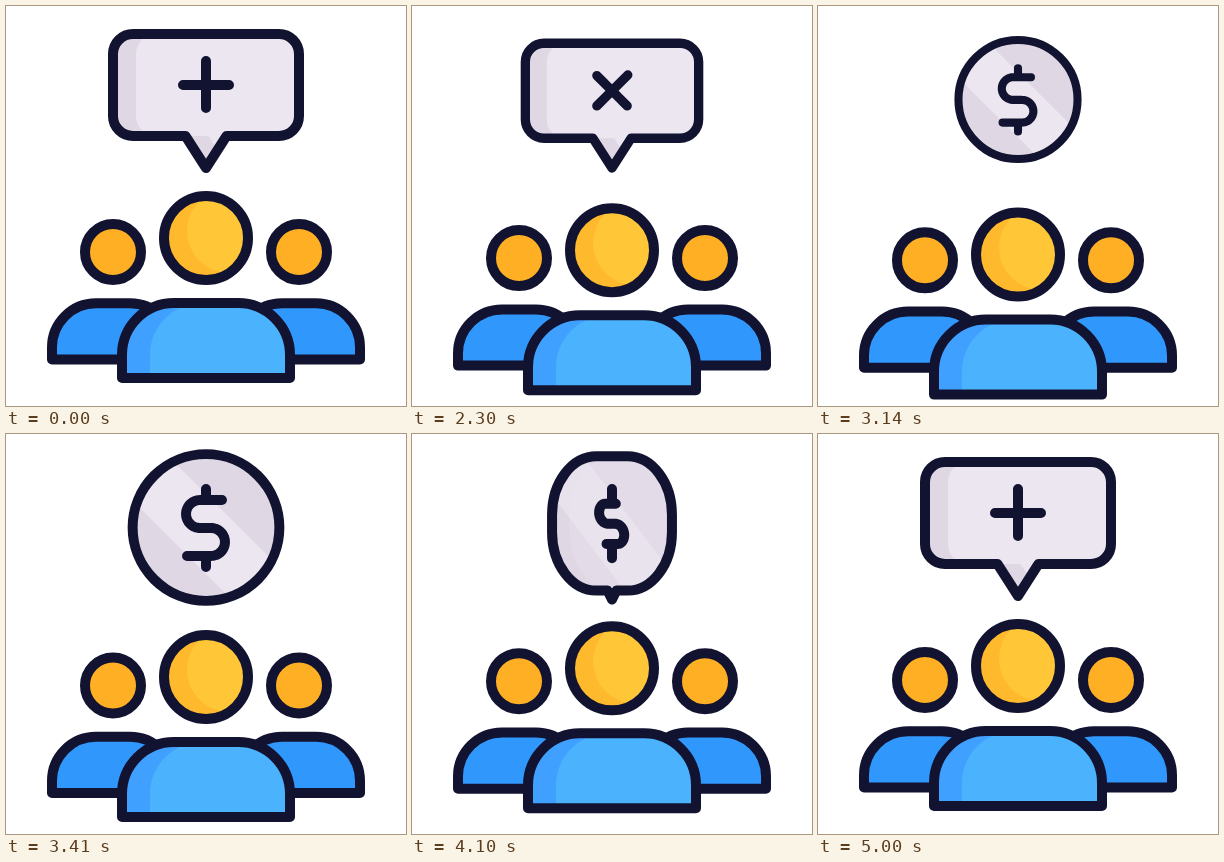
Recreate the animation shown at these times as an HTML page with a canvas. Size 400x400 px, loop 5.03 s.

```html
<!DOCTYPE html>
<html lang="en">
<head>
<meta charset="utf-8">
<title>Group and message</title>
<style>
html, body { margin: 0; width: 100%; height: 100%; overflow: hidden; background: #fff; }
canvas { display: block; width: 400px; height: 400px; }
</style>
</head>
<body>
<canvas id="stage" width="400" height="400"></canvas>
<script>
const ctx = document.getElementById('stage').getContext('2d');
const LOOP = 5030, HOLD = 2030, STEP = 30;
const INK = '#121331', PALE = '#ebe6ef', SHADE = '#dfd8e4';
const YELLOW = '#ffc738', AMBER = '#ffb92c', ORANGE = '#ffaf24';
const SKY = '#4bb3fd', AZURE = '#40a0ff', BLUE = '#3098fd';

const mix = (a, b, k) => a + (b - a) * k;
const smooth = (a, b, t) => {
  const k = Math.min(1, Math.max(0, (t - a) / (b - a)));
  return k * k * (3 - 2 * k);
};

// Monotone cubic curve through [time, value] keys
function track(keys) {
  const n = keys.length;
  const rise = i => (keys[i + 1][1] - keys[i][1]) / (keys[i + 1][0] - keys[i][0]);
  const slope = keys.map((k, i) => {
    if (i === 0 || i === n - 1) return 0;
    const a = rise(i - 1), b = rise(i);
    return a * b <= 0 ? 0 : 2 * a * b / (a + b);
  });
  return t => {
    if (t <= keys[0][0]) return keys[0][1];
    if (t >= keys[n - 1][0]) return keys[n - 1][1];
    let i = 0;
    while (t > keys[i + 1][0]) i++;
    const [t0, v0] = keys[i], [t1, v1] = keys[i + 1];
    const h = t1 - t0, u = (t - t0) / h, u2 = u * u, u3 = u2 * u;
    return v0 * (2 * u3 - 3 * u2 + 1) + v1 * (3 * u2 - 2 * u3)
      + h * (slope[i] * (u3 - 2 * u2 + u) + slope[i + 1] * (u3 - u2));
  };
}

const push = track([[2030, 0], [2480, 20], [2600, 20.8], [2690, 20.5], [3140, 16.6],
  [3650, 6.2], [4190, 1.8], [4520, 0.6], [5000, 0]]);
const zoom = track([[2000, 1], [2030, 0.98], [2180, 0.88], [2530, 1.07], [2690, 1.068],
  [2950, 0.68], [3140, 0.81], [3430, 1]]);
const spin = track([[2000, 0], [2030, 2.5], [2300, 45], [2620, 90]]);

function outline(width = 10) {
  ctx.lineWidth = width;
  ctx.strokeStyle = INK;
  ctx.stroke();
}

function disc(x, y, r) {
  ctx.beginPath();
  ctx.arc(x, y, r, 0, Math.PI * 2);
}

function torso(l, r, top, bottom, rad) {
  ctx.beginPath();
  ctx.moveTo(l, bottom);
  ctx.arc(l + rad, top + rad, rad, Math.PI, Math.PI * 1.5);
  ctx.arc(r - rad, top + rad, rad, -Math.PI / 2, 0);
  ctx.lineTo(r, bottom);
  ctx.closePath();
}

// Fill base, lay a lighter copy inside it, then outline
function shaded(shape, base, light, dx, dy) {
  shape(0, 0);
  ctx.fillStyle = base;
  ctx.fill();
  ctx.save();
  ctx.clip();
  shape(dx, dy);
  ctx.fillStyle = light;
  ctx.fill();
  ctx.restore();
  shape(0, 0);
  outline();
}

function people(dy) {
  for (const side of [1, -1]) {
    ctx.save();
    ctx.translate(200, dy / 2);
    ctx.scale(side, 1);
    ctx.translate(-200, 0);
    torso(46, 168, 297.3, 353.5, 44);
    ctx.fillStyle = BLUE;
    ctx.fill();
    outline();
    disc(107, 246, 28);
    ctx.fillStyle = ORANGE;
    ctx.fill();
    outline();
    ctx.restore();
  }
  ctx.save();
  ctx.translate(0, dy);
  shaded((x, y) => torso(116 + x, 284 + x, 297 + y, 372 + y, 52), AZURE, SKY, 28, 0);
  shaded((x, y) => disc(200 + x, 232 + y, 42), AMBER, YELLOW, 23, -7);
  ctx.restore();
}

// Speech bubble at m = 0, coin at m = 1
function badge(m, dx = 0) {
  const half = mix(93, 73.5, m), top = mix(28, 20, m), bottom = mix(130, 167, m);
  const r = mix(20, 73.5, m), foot = mix(20.5, 0, m), tip = mix(162, 167, m);
  const l = 200 - half + dx, e = 200 + half + dx, q = Math.PI / 2;
  ctx.beginPath();
  ctx.arc(l + r, top + r, r, 2 * q, 3 * q);
  ctx.arc(e - r, top + r, r, -q, 0);
  ctx.arc(e - r, bottom - r, r, 0, q);
  ctx.lineTo(200 + foot + dx, bottom);
  ctx.lineTo(200 + dx, tip);
  ctx.lineTo(200 - foot + dx, bottom);
  ctx.arc(l + r, bottom - r, r, q, 2 * q);
  ctx.closePath();
}

// Point on the dollar's S by share of its length
function curl(u) {
  const bend = 14 * Math.PI, parts = [22, bend, 11, bend, 24];
  let d = u * parts.reduce((a, b) => a + b), i = 0;
  while (i < 4 && d > parts[i]) d -= parts[i++];
  const a = d / 14;
  if (i === 0) return [216 - d, 66];
  if (i === 1) return [194 - 14 * Math.sin(a), 80 - 14 * Math.cos(a)];
  if (i === 2) return [194 + d, 94];
  if (i === 3) return [205 + 14 * Math.sin(a), 108 - 14 * Math.cos(a)];
  return [205 - d, 122];
}

function sign(m) {
  ctx.beginPath();
  for (let i = 0; i <= 80; i++) {
    const u = i / 80, [x, y] = curl(u);
    ctx.lineTo(mix(177 + 46 * u, x, m), mix(79, y, m));
  }
  ctx.moveTo(200, 55);
  ctx.lineTo(200, mix(79, 66, m));
  ctx.moveTo(200, mix(79, 122, m));
  ctx.lineTo(200, mix(102, 133, m));
}

function token(m, s, sx, turn) {
  const oy = mix(163, 93.5, m);
  const place = () => {
    ctx.translate(200, oy);
    ctx.scale(s * sx, s);
    ctx.translate(-200, -oy);
  };
  ctx.save();
  place();
  badge(m);
  ctx.fillStyle = SHADE;
  ctx.fill();
  ctx.clip();
  ctx.fillStyle = PALE;
  ctx.globalAlpha = 1 - m;
  badge(m, 23);
  ctx.fill();
  ctx.globalAlpha = m;
  ctx.beginPath();
  ctx.moveTo(60, 0);
  ctx.lineTo(140, 0);
  ctx.lineTo(340, 200);
  ctx.lineTo(260, 200);
  ctx.fill();
  ctx.restore();

  // Paths are placed first so the pen keeps its weight when squeezed
  ctx.save();
  place();
  badge(m);
  ctx.restore();
  outline(10 * s);

  ctx.save();
  place();
  ctx.translate(200, 79);
  ctx.rotate(turn * Math.PI / 180);
  ctx.translate(-200, -79);
  sign(m);
  ctx.restore();
  outline(10 * s);
}

function draw(t) {
  ctx.fillStyle = '#fff';
  ctx.fillRect(0, 0, 400, 400);
  ctx.lineCap = ctx.lineJoin = 'round';
  people(push(t));
  const m = smooth(2630, 3000, t) - smooth(3960, 4360, t);
  const flip = Math.abs(Math.cos(Math.PI * smooth(3700, 5000, t)));
  // A plus looks the same after a quarter turn
  const turn = spin(t) % 90;
  token(m, zoom(t), Math.max(flip, 0.001), turn);
}

const start = performance.now();
function tick() {
  const t = (performance.now() - start) % LOOP;
  draw(t < HOLD ? 0 : HOLD + Math.floor((t - HOLD) / STEP) * STEP);
  requestAnimationFrame(tick);
}
tick();
</script>
</body>
</html>
```
